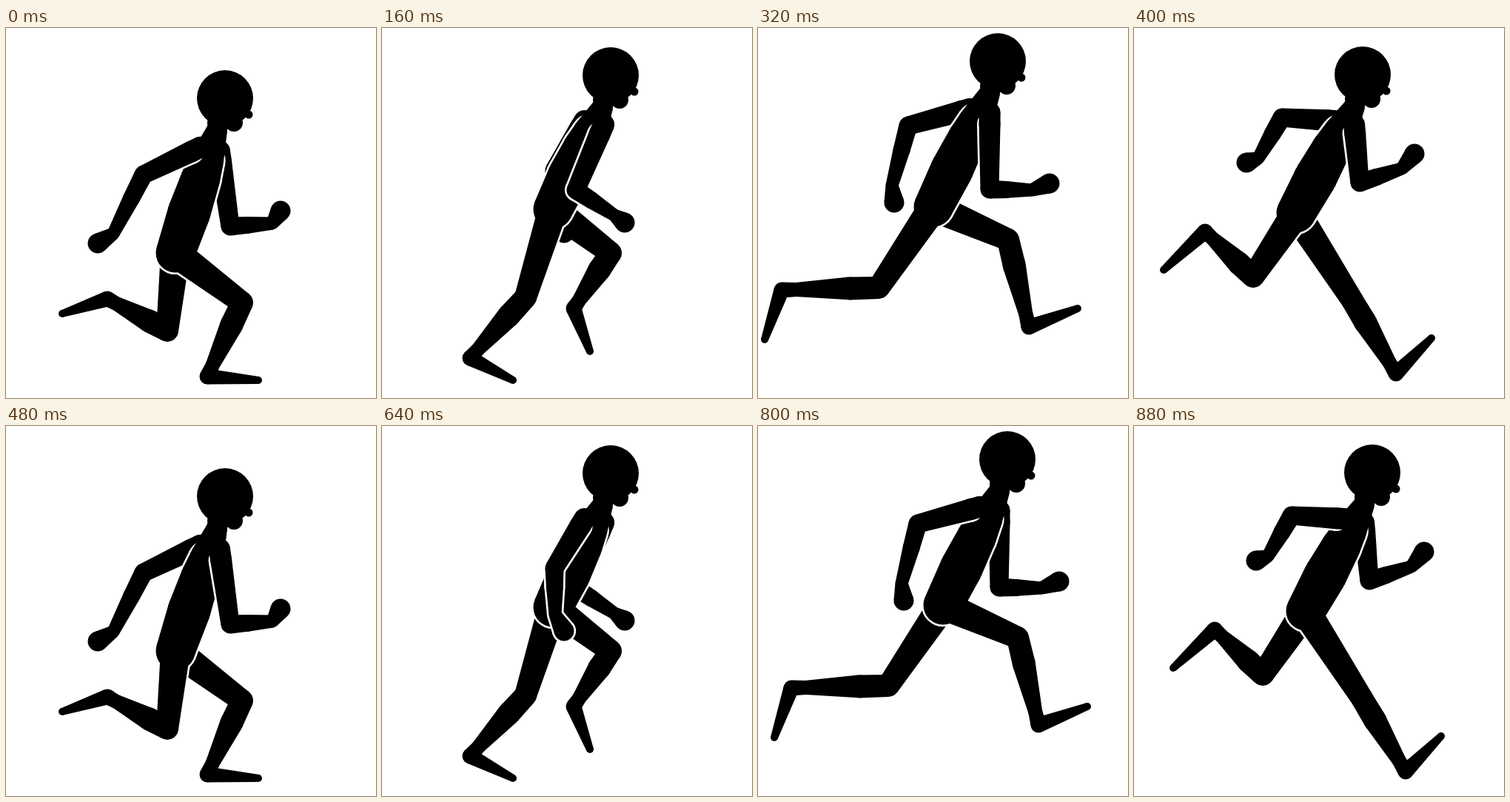
An HTML page with a canvas that plays this animation: 500x500 px, repeating every 0.96 s.

```html
<!DOCTYPE html>
<html lang="en">
<head>
<meta charset="utf-8">
<title>Run cycle</title>
<style>
html, body { margin: 0; width: 100%; height: 100%; overflow: hidden; background: #fff; }
canvas { display: block; width: 500px; height: 500px; }
</style>
</head>
<body>
<canvas id="stage" width="500" height="500"></canvas>
<script>
const ctx = document.getElementById('stage').getContext('2d');
const STEP = 80;   // each drawing is held this long
const GAP = 2.6;   // white line between overlapping parts
const DRIFT = 13;  // the second stride lands further right

// Joints of the key poses. Arms: elbow, wrist, hand. Legs: knee, heel, toe.
const contact = {
  neck: [285, 138], hip: [229, 304],
  front: [[303, 268], [360, 264], [371, 247]],
  back: [[186, 198], [145, 278], [124, 291]],
  lead: [[319, 371], [272, 471], [341, 476]],
  trail: [[218, 409], [137, 366], [76, 386]]
};
const drive = {
  neck: [298, 107], hip: [231, 245],
  front: [[262, 219], [314, 253], [328, 263]],
  back: [[233, 192], [234, 255], [246, 277]],
  lead: [[309, 304], [259, 379], [281, 437]],
  trail: [[194, 364], [119, 446], [177, 476]]
};
const flight = {
  neck: [313, 88], hip: [237, 242],
  front: [[313, 218], [370, 219], [394, 210]],
  back: [[203, 132], [181, 213], [184, 236]],
  lead: [[338, 286], [366, 404], [432, 379]],
  trail: [[163, 351], [32, 354], [9, 421]]
};
const reach = {
  neck: [298, 106], hip: [219, 250],
  front: [[305, 209], [362, 190], [379, 170]],
  back: [[200, 121], [168, 176], [152, 182]],
  lead: [[295, 368], [354, 467], [402, 419]],
  trail: [[161, 336], [96, 275], [40, 327]]
};

const lerp = (a, b, t) => [a[0] + (b[0] - a[0]) * t, a[1] + (b[1] - a[1]) * t];
const add = (p, x, y) => [p[0] + x, p[1] + y];

function mapJoints(pose, move) {
  const moved = {};
  for (const [name, part] of Object.entries(pose)) {
    moved[name] = Array.isArray(part[0]) ? part.map((p, i) => move(p, name, i)) : move(part, name);
  }
  return moved;
}
const shift = (pose, x) => mapJoints(pose, p => add(p, x, 0));
const between = (a, b, lift) => mapJoints(a, (p, name, i) =>
  add(lerp(p, i === undefined ? b[name] : b[name][i], 0.5), 0, -lift));

// The limbs pass each other: what was ahead is now behind.
const crossed = p => ({ ...p, front: p.back, back: p.front, lead: p.trail, trail: p.lead });

const stride = drift => {
  const air = shift(flight, drift);
  return [contact, between(crossed(contact), drive, -3), drive, between(drive, air, 16), air, shift(reach, drift)];
};
const cels = [...stride(0), ...stride(DRIFT)];

// A limb is a chain of [point, radius] joined by tapered segments.
const dot = ([x, y], r) => {
  ctx.beginPath();
  ctx.arc(x, y, r, 0, 2 * Math.PI);
  ctx.fill();
};

function chain(links, color, grow = 0) {
  ctx.fillStyle = color;
  links.forEach(([b, rb], i) => {
    dot(b, rb + grow);
    if (!i) return;
    const [a, ra] = links[i - 1];
    const angle = Math.atan2(b[1] - a[1], b[0] - a[0]);
    const lean = Math.acos(Math.max(-1, Math.min(1, (ra - rb) / Math.hypot(b[0] - a[0], b[1] - a[1]))));
    ctx.beginPath();
    for (const [p, r, side] of [[a, ra, 1], [b, rb, 1], [b, rb, -1], [a, ra, -1]]) {
      const turn = angle + side * lean;
      ctx.lineTo(p[0] + Math.cos(turn) * (r + grow), p[1] + Math.sin(turn) * (r + grow));
    }
    ctx.fill();
  });
}

const arm = (shoulder, [elbow, wrist, hand]) => [
  [shoulder, 14.5], [lerp(shoulder, elbow, 0.15), 14.5], [elbow, 12.5],
  [lerp(elbow, wrist, 0.4), 11.5], [wrist, 8.5], [hand, 13.5]];

const leg = (hip, [knee, heel, toe]) => [
  [hip, 20], [knee, 15], [lerp(knee, heel, 0.3), 15.5],
  [lerp(knee, heel, 0.85), 9.5], [heel, 10.5], [toe, 5]];

const trunk = (neck, hip) => [
  [neck, 14], [lerp(neck, hip, 0.25), 23], [lerp(neck, hip, 0.4), 26.5],
  [lerp(neck, hip, 0.67), 29], [hip, 26.5]];

function drawHead(neck) {
  const at = (x, y, r) => dot(add(neck, x, y), r);
  at(11, -43, 38);
  at(43, -21, 5.5);
  at(23, -10, 12);
  at(2, -10, 15);
}

function draw(index) {
  const pose = cels[index];
  const leadNear = index === 0 || index > 6;
  const shoulder = lerp(pose.neck, pose.hip, 0.17);
  const frontArm = arm(add(shoulder, 13, 0), pose.front);
  const backArm = arm(add(shoulder, -13, -5), pose.back);
  const [nearArm, farArm] = leadNear ? [backArm, frontArm] : [frontArm, backArm];
  const legs = [leg(pose.hip, pose.lead), leg(pose.hip, pose.trail)];
  const [nearLeg, farLeg] = leadNear ? legs : legs.reverse();
  const body = trunk(pose.neck, pose.hip);

  ctx.fillStyle = '#fff';
  ctx.fillRect(0, 0, 500, 500);
  // Far to near; the gap starts past each root so joints stay solid.
  for (const layer of [[farArm], [farLeg], [body, nearLeg], [nearArm]]) {
    if (layer[0] !== farArm && layer[0] !== farLeg) {
      layer.forEach(part => chain(part === nearLeg ? part : part.slice(1), '#fff', GAP));
    }
    layer.forEach(part => chain(part, '#000'));
  }
  drawHead(pose.neck);
}

const start = performance.now();
let shown = -1;
function tick() {
  const index = Math.floor((performance.now() - start) / STEP) % cels.length;
  if (index !== shown) draw(shown = index);
  requestAnimationFrame(tick);
}
tick();
</script>
</body>
</html>
```
